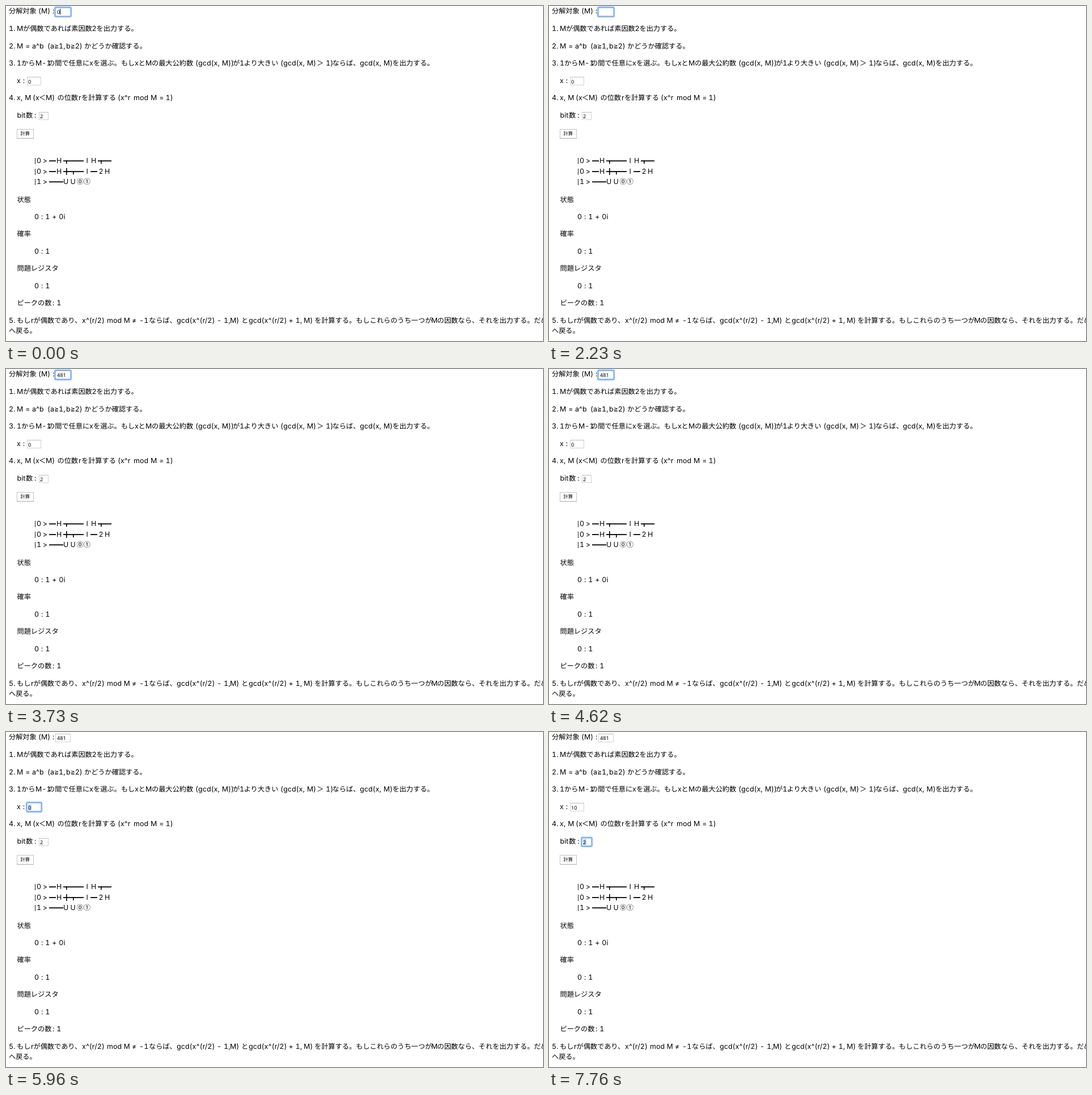
An HTML page with a canvas for the animation above (8 s loop, 947 by 591 pixels).

```html
<!DOCTYPE html>
<html lang="ja">
<head>
<meta charset="utf-8">
<title>素因数分解</title>
<style>
html, body { margin: 0; width: 100%; height: 100%; overflow: hidden; background: #fff; }
canvas, svg { position: absolute; left: 0; top: 0; display: block; }
text { white-space: pre; text-rendering: geometricPrecision; fill: #000; }
.latin { font: 12.4px Inter, sans-serif; font-variant-numeric: tabular-nums; letter-spacing: 0.12px; word-spacing: 0.4px; }
.kanji { font: 12.2px "Noto Sans CJK JP", "Noto Sans CJK", sans-serif; }
.sign { font: 9.5px "DejaVu Sans", sans-serif; baseline-shift: 1.2px; }
.field { font: 500 9.1px "Noto Sans", sans-serif; }
.button { font: 8.3px "Noto Sans CJK JP", "Noto Sans CJK", sans-serif; }
</style>
</head>
<body>
<canvas id="stage" width="947" height="591"></canvas>
<svg id="words" width="947" height="591"></svg>
<script>
const ctx = document.getElementById('stage').getContext('2d');
const words = document.getElementById('words');
const LOOP = 8000;
const RUNS = /≧|[\u2460-\u24ff\u3000-\u9fff\uff00-\uffef]+|[^≧\u2460-\u24ff\u3000-\u9fff\uff00-\uffef]+/g;

// Each line: baseline, then pairs of x and text.
const LINES = [
  [13.4, 5, '分解対象', 57, '(M) :'],
  [44, 5, '1.', 19, 'M', 30, 'が偶数であれば素因数', 151.5, '2', 159.5, 'を出力する。'],
  [74.5, 5, '2.', 19, 'M =', 46, 'a^b', 73, '(a≧1,', 106, 'b≧2)', 138, 'かどうか確認する。'],
  [105.2, 5, '3.', 19, '1', 27, 'から', 52, 'M-1', 74, 'の間で任意に', 147, 'x', 154, 'を選ぶ。もし',
    227, 'x', 233.5, 'と', 246, 'M', 257, 'の最大公約数', 334, '(gcd(x, M))', 400, 'が', 412, '1',
    419.5, 'より大きい', 484, '(gcd(x, M)', 548, '＞', 564, '1)', 575.5, 'ならば、', 624, 'gcd(x, M)', 681.5, 'を出力する。'],
  [136, 19, 'x :'],
  [166.2, 5, '4.', 19, 'x, M', 47, '(x', 58, '＜', 70, 'M)', 90.5, 'の位数', 128, 'r', 133, 'を計算する',
    197, '(x^r', 225, 'mod', 255, 'M =', 281.5, '1)'],
  [197.2, 19.5, 'bit', 35, '数', 50, ':'],
  [345.5, 19.5, '状態'],
  [375.7, 50, '0 : 1 + 0i'],
  [406.2, 19.5, '確率'],
  [437, 50, '0 : 1'],
  [467.3, 19.5, '問題レジスタ'],
  [498, 50, '0 : 1'],
  [528.3, 19.5, 'ピークの数', 82, ': 1'],
  [558.5, 5, '5.', 19, 'もし', 44, 'r', 48.5, 'が偶数であり、', 134, 'x^(r/2)', 178, 'mod', 207.5, 'M', 222, '≠', 235, '-1',
    252, 'ならば、', 301, 'gcd(x^(r/2)', 372, '- 1,', 395, 'M)', 415, 'と', 428, 'gcd(x^(r/2)', 498.5, '+ 1,', 525, 'M)',
    544, 'を計算する。もしこれらのうち一つが', 750, 'M', 760.5, 'の因数なら、それを出力する。だめ'],
  [577, 5, 'へ戻る。'],
  [277.2, 54, '0', 65, '>', 89, 'H', 141.5, 'I', 150, 'H'],
  [296, 54, '0', 65, '>', 89, 'H', 141.5, 'I', 163.5, '2', 174, 'H'],
  [314.2, 54, '1', 65, '>', 101, 'U', 113.5, 'U', 124.5, '⓪①']
];

const BOXES = {
  m: { x: 87, y: 3, w: 27, h: 15, textX: 90, base: 14 },
  x: { x: 37, y: 125, w: 25, h: 15, textX: 39, base: 137 },
  bit: { x: 58, y: 187, w: 17, h: 14, textX: 60, base: 198 }
};

// Start time, focused box, its value, caret x (0 = hidden, -1 = selected).
const STEPS = [
  [0, 'm', '0', 95], [300, 'm', '0', 0], [740, 'm', '0', 95], [1340, 'm', '0', 0], [1790, 'm', '0', 95],
  [1940, 'm', '', 90], [2230, 'm', '', 0], [2380, 'm', '4', 96], [2830, 'm', '48', 101],
  [3130, 'm', '481', 105], [3730, 'm', '481', 0], [4180, 'm', '481', 105], [4620, 'm', '481', 0],
  [5220, 'm', '481', 105], [5670, 'm', '481', 0],
  [5960, 'x', '0', -1], [7010, 'x', '1', 44], [7460, 'x', '10', 49], [7760, 'bit', '2', -1]
];

function add(parent, tag, attrs, content = '') {
  const node = document.createElementNS('http://www.w3.org/2000/svg', tag);
  for (const key in attrs) node.setAttribute(key, attrs[key]);
  node.textContent = content;
  return parent.appendChild(node);
}

function styleOf(run) {
  if (run === '≧') return 'sign';
  return /[\u2460-\u24ff\u3000-\uffef]/.test(run) ? 'kanji' : 'latin';
}

function buildWords() {
  for (const [y, ...parts] of LINES)
    for (let i = 0; i < parts.length; i += 2) {
      const line = add(words, 'text', { x: parts[i], y });
      for (const run of parts[i + 1].match(RUNS)) add(line, 'tspan', { class: styleOf(run) }, run);
    }
  add(words, 'text', { x: 25.5, y: 228, class: 'button' }, '計算');
  for (const box of Object.values(BOXES))
    box.label = add(words, 'text', { x: box.textX, y: box.base, class: 'field' });
}

function rect(color, x, y, w, h) {
  ctx.fillStyle = color;
  ctx.fillRect(x, y, w, h);
}

function wire(x, y, w, stub = 0) {
  rect('#000', x, y, w, 1.8);
  if (stub) rect('#000', stub, y, 1.6, 6);
}

function circuit() {
  for (const y of [268, 287, 305]) rect('#222', 51, y, 1, 11);
  wire(76, 272.4, 12);
  wire(101, 272.4, 36, 106);
  wire(162, 272.4, 24, 167);
  wire(76, 291.2, 12);
  wire(101, 291.2, 36, 118);
  rect('#000', 106, 286, 1.6, 12);
  wire(149, 291.2, 12);
  wire(76, 309.4, 25);
}

function button() {
  rect('#c4c4c4', 19, 217, 30, 17);
  rect('#a9a9a9', 19, 233, 30, 1);
  rect('#fff', 20, 218, 28, 15);
}

function ring(x, y, w, h, grow, width, color) {
  ctx.beginPath();
  ctx.roundRect(x - grow, y - grow, w + 2 * grow, h + 2 * grow, 2);
  ctx.lineWidth = width;
  ctx.strokeStyle = color;
  ctx.stroke();
}

function field(box, value, focused, caret) {
  const { x, y, w, h, textX, base, label } = box;
  if (focused) {
    ring(x, y, w, h, 1.5, 2, '#cfe2fb');
    ring(x, y, w, h, 0.5, 2.4, '#7fb2f3');
    if (caret < 0) rect('#b3d5fd', textX, base - 9, 6, 10);
    if (caret > 0) rect('#000', caret, base - 9, 1, 10);
  } else {
    rect('#d2d2d2', x, y, w, h);
    rect('#bdbdbd', x, y, w, 1);
    rect('#fff', x + 1, y + 1, w - 2, h - 2);
  }
  if (label.textContent !== value) label.textContent = value;
}

function draw(now) {
  const t = now % LOOP;
  const values = { m: '', x: '0', bit: '2' };
  let focus, caret;
  for (const [start, name, value, pos] of STEPS) {
    if (start > t) break;
    values[name] = value;
    focus = name;
    caret = pos;
  }
  rect('#fff', 0, 0, 947, 591);
  circuit();
  button();
  for (const name in BOXES) field(BOXES[name], values[name], name === focus, caret);
}

buildWords();
const begin = performance.now();
function tick() {
  draw(performance.now() - begin);
  requestAnimationFrame(tick);
}
tick();
</script>
</body>
</html>
```
